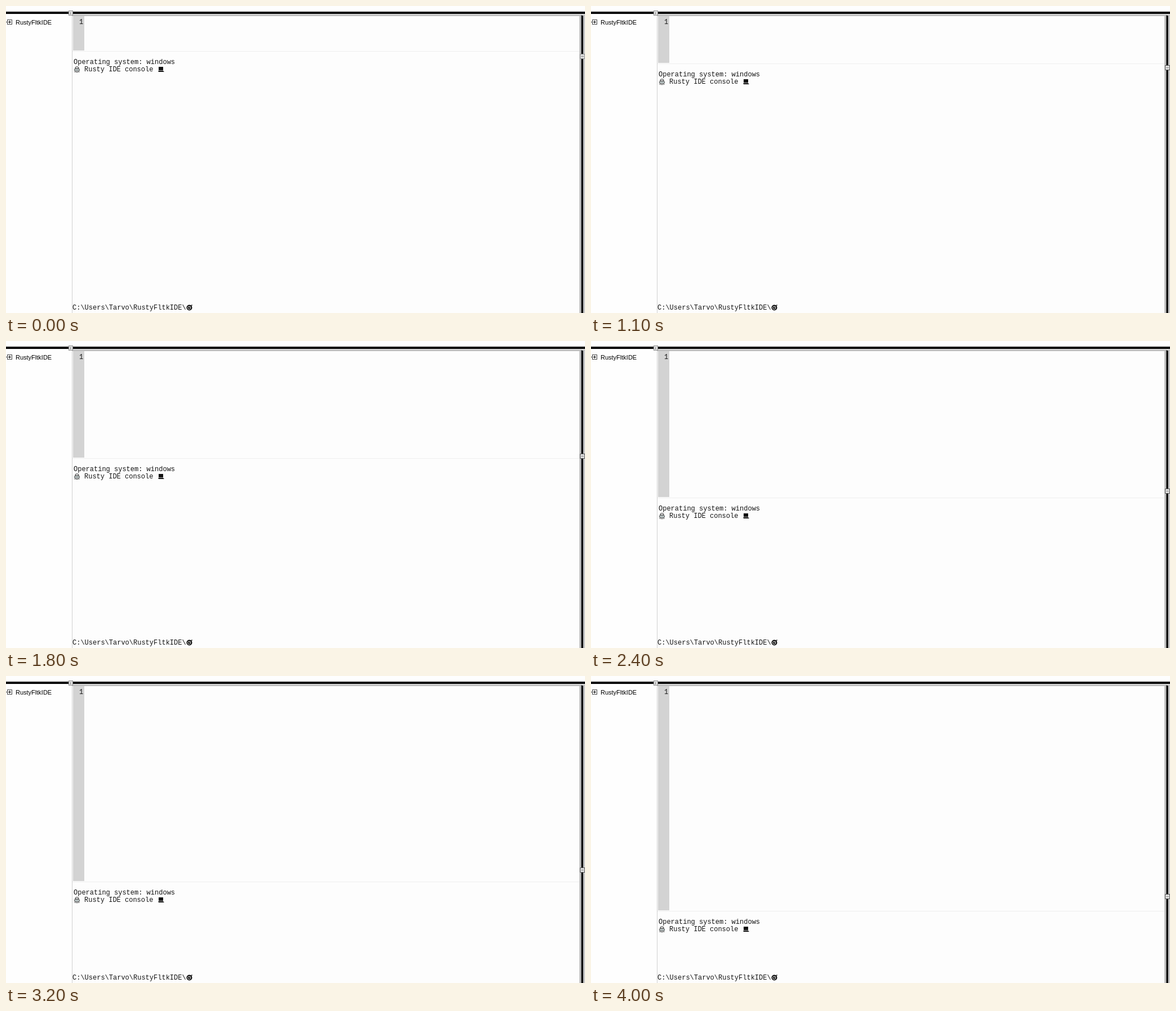
Write an HTML page that moves like this. It is 1028 px wide and 545 px high and loops after 5.4 s.

```html
<!DOCTYPE html>
<html lang="en">
<head>
<meta charset="utf-8">
<title>Resizable editor and console</title>
<style>
  html, body { margin: 0; width: 100%; height: 100%; overflow: hidden; background: #fefefe; }
  svg { display: block; width: 1028px; height: 545px; }
  rect { shape-rendering: crispEdges; }
  text { white-space: pre; fill: #000; }
  .mono { font: 12px "Liberation Mono", monospace; fill: #141414; }
  .sans { font: 11px "Liberation Sans", sans-serif; }
  .face { fill: #c0c0c0; }
  .shade { fill: #555; }
  .groove { fill: #000; }
  .light { fill: #eee; }
  .thumb { fill: #dcdcdc; stroke: #909090; }
  .thumb.pressed { fill: #dcdcdc; stroke: #585858; }
</style>
</head>
<body>
<svg viewBox="0 0 1028 545">
  <rect width="1028" height="545" fill="#fefefe"/>

  <!-- project tree -->
  <g fill="none" stroke="#444" shape-rendering="crispEdges">
    <path d="M0 28.5H3"/>
    <rect x="2.5" y="24.5" width="8" height="8"/>
    <path d="M4 28.5H9M6.5 26V31" stroke="#000"/>
  </g>
  <text class="sans" x="17" y="33">RustyFltkIDE</text>

  <!-- editor -->
  <rect x="117" y="17" width="901" height="528" fill="#fdfdfd"/>
  <rect x="117" y="15" width="1" height="530" fill="#d0d0d0"/>
  <rect id="gutter" x="119" y="18" width="20" fill="#d3d3d3"/>
  <text class="mono" x="130" y="32">1</text>

  <!-- console -->
  <g id="console">
    <rect x="118" y="80" width="900" height="1" fill="#efefef"/>
    <text class="mono" x="120" y="103">Operating system: windows</text>
    <text class="mono" x="139" y="116">Rusty IDE console</text>
    <g fill="none" stroke="#333" stroke-width=".9">
      <path d="M122.5 111.5Q122.5 107.5 126 107.5Q129.5 107.5 129.5 111.5"/>
      <rect x="121.5" y="111.5" width="9" height="4" rx="1.5" fill="#d4e0e0"/>
      <path d="M122.5 116V118M129.5 116V118M124 117.5H128"/>
      <path d="M124.5 109V111M127.5 109V111M123.5 113.5H125M127 113.5H128.5"/>
    </g>
    <path d="M271 108H279V114H271ZM270 115H279L281 117H271Z" fill="#111"/>
    <path d="M271.5 114.5H279" stroke="#888" stroke-width=".7"/>
  </g>
  <text class="mono" x="118" y="539">C:\Users\Tarvo\RustyFltkIDE\</text>
  <g fill="none" stroke="#fff">
    <circle cx="325.5" cy="535.5" r="5" fill="#111" stroke="none"/>
    <circle cx="325.2" cy="535.8" r="2.6" stroke-width=".9"/>
    <path d="M325.5 535.5L328.5 532.5" stroke-width=".9"/>
    <path d="M327.5 533.5L330.5 530.5" stroke="#111" stroke-width="1.5"/>
  </g>

  <!-- horizontal slider -->
  <rect class="face" y="9" width="1028" height="6"/>
  <rect class="face" x="117" y="15" width="911" height="3"/>
  <rect class="shade" y="10" width="1028" height="1"/>
  <rect class="groove" y="11" width="1028" height="3"/>
  <rect class="light" y="14" width="1028" height="1"/>
  <g transform="translate(111 8)">
    <rect class="thumb" x=".5" y=".5" width="7" height="8" rx="1"/>
    <rect x="3" y="3" width="1" height="4" fill="#888"/>
  </g>

  <!-- vertical slider -->
  <rect class="face" x="1018" y="15" width="10" height="530"/>
  <rect class="shade" x="1021" y="16" width="1" height="529"/>
  <rect class="groove" x="1022" y="17" width="3" height="528"/>
  <rect class="light" x="1025" y="16" width="1" height="529"/>
  <g id="handle">
    <rect id="thumb" class="thumb" x="1019.5" y=".5" width="8" height="8" rx="1"/>
    <rect x="1021" y="4" width="5" height="1" fill="#888"/>
  </g>
</svg>
<script>
  const LOOP = 5400, STEP = 100, PRESS = 700;
  const THUMB_RATIO = 302 / 337;
  // [time in ms, distance the divider has been dragged down]
  const drag = [
    [700, 0], [900, 11], [1000, 11], [1400, 53], [1600, 86], [1800, 128],
    [2200, 174], [2400, 198], [2800, 244], [3200, 285], [3400, 302],
    [3800, 331], [3900, 331], [4000, 337]
  ];
  const byId = id => document.getElementById(id);
  const gutter = byId("gutter"), consolePane = byId("console");
  const handle = byId("handle"), thumb = byId("thumb");

  function dragAt(time) {
    const next = drag.findIndex(([t]) => t > time);
    if (next < 0) return drag[drag.length - 1][1];
    if (next === 0) return 0;
    const [t0, y0] = drag[next - 1], [t1, y1] = drag[next];
    return Math.round(y0 + (y1 - y0) * (time - t0) / (t1 - t0));
  }

  function draw() {
    const time = Math.floor(performance.now() % LOOP / STEP) * STEP;
    const offset = dragAt(time);
    gutter.setAttribute("height", 61 + offset);
    consolePane.setAttribute("transform", `translate(0 ${offset})`);
    handle.setAttribute("transform", `translate(0 ${85 + Math.round(offset * THUMB_RATIO)})`);
    thumb.classList.toggle("pressed", time >= PRESS);
    requestAnimationFrame(draw);
  }
  draw();
</script>
</body>
</html>
```
